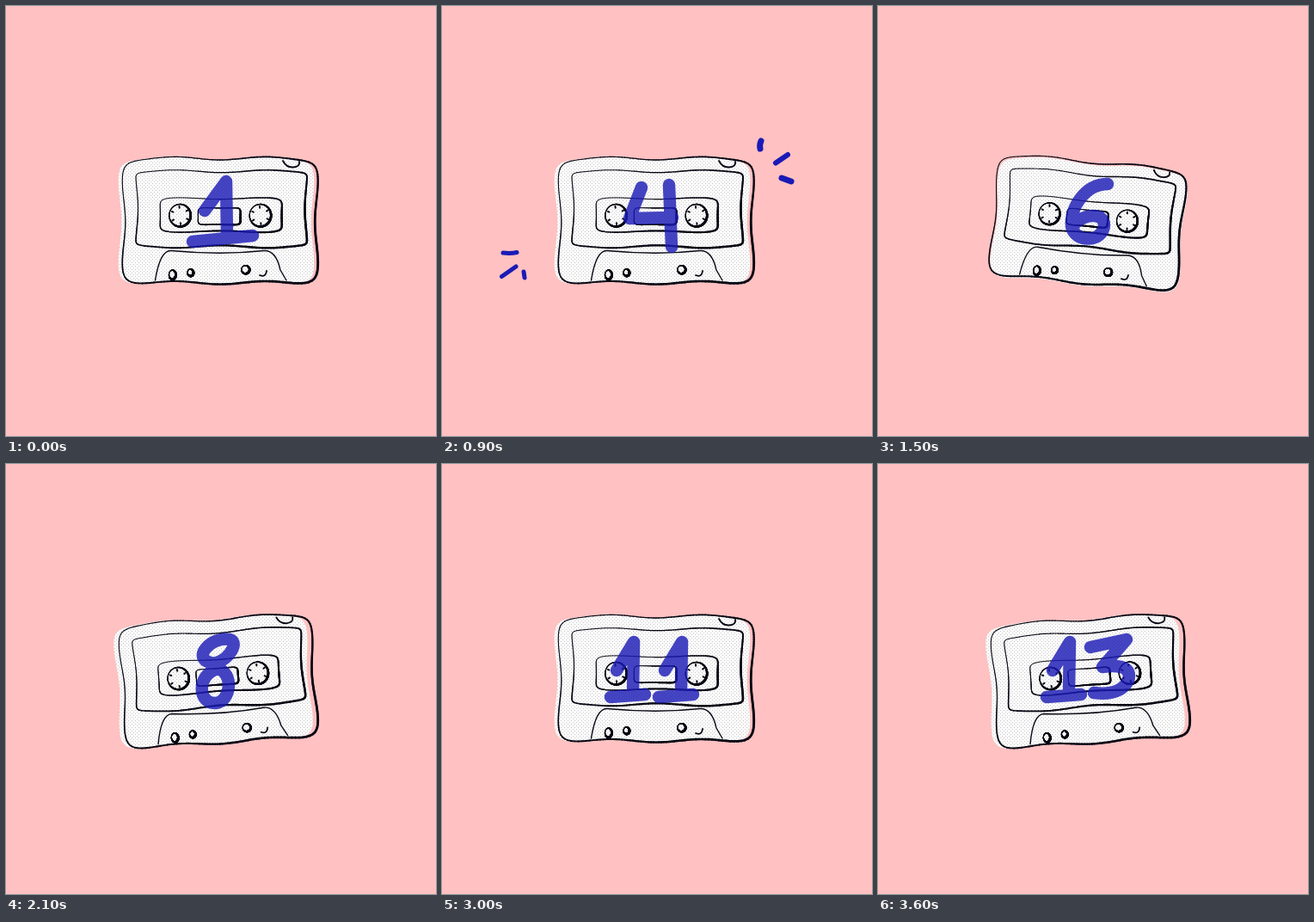
An HTML page with a canvas that plays this animation: 500x500 px, repeating every 3900 ms.

```html
<!DOCTYPE html>
<html lang="en">
<head>
<meta charset="utf-8">
<title>Counting cassette</title>
<style>
  html, body { margin: 0; width: 100%; height: 100%; overflow: hidden; background: #ffc1c1; }
  canvas { display: block; width: 500px; height: 500px; }
</style>
</head>
<body>
<canvas id="stage" width="500" height="500"></canvas>
<script>
const ctx = document.getElementById('stage').getContext('2d');
const STEP = 300, BEATS = 13, TAU = 2 * Math.PI;
const PINK = '#ffc1c1', INK = '#080814', BLUE = '#1a1ab6';

// Place of the cassette's middle, tilt in degrees, size, offset of the paper behind the lines
const poses = {
  A: { x: 249, y: 243.5, tilt: 0, size: 1, slip: [-4.5, 0] },
  B: { x: 244.5, y: 245.7, tilt: 5.3, size: .972, slip: [1.5, 2] },
  C: { x: 246.5, y: 246.2, tilt: -3.9, size: .99, slip: [-6, 0] },
  D: { x: 246.5, y: 246.2, tilt: 1.9, size: .994, slip: [-4, 0] }
};
const poseOrder = 'ABCADBACDBADC';
const markOrder = { 1: 'waves', 3: 'rays', 4: 'bolts', 6: 'sparks', 8: 'waves', 9: 'rays', 11: 'bolts' };

// Digits are drawn around their own middle
const digits = [
  'M-2 -27 C-26 -29 -26 32 -7 32 C18 35 26 -8 12 -22 Q6 -29 -2 -27',
  'M-19 -2 L6 -36 L7 27 M-33 34 L37 27',
  'M-23 -15 C-15 -34 9 -39 15 -25 C19 -8 -7 13 -22 29 Q-3 17 12 27 Q20 32 30 30',
  'M-28 -27 L14 -36 L-14 -4 Q22 -9 16 12 Q6 30 -24 26',
  'M-18 -29 L-32 7 L18 6 M14 -32 L17 40',
  'M17 -33 L-17 -32 L-20 -5 Q15 -12 17 12 Q10 37 -25 30',
  'M17 -33 C-10 -33 -27 -4 -25 16 C-22 36 12 35 13 15 C13 -1 -12 2 -22 14',
  'M-27 -30 L21 -34 Q2 -2 -6 37 M-20 3 L13 1',
  'M10 -36 C-12 -40 -34 -14 -12 -9 C4 -5 24 -33 10 -36 M-4 -2 C-30 6 -26 40 -6 38 C12 36 15 2 -4 -2',
  'M14 -29 C-6 -41 -27 -21 -19 -8 C-7 6 16 -10 15 -29 Q12 7 3 37'
];
const teen = 'M-16 0 L4 -33 L3 26 M-23 31 L17 28';

// Stroke width and path
const marks = {
  rays: [[7, 'M371 157 Q369 161 370 166 M395 200 L406 204'], [6, 'M388 182.5 L402 173'],
    [5, 'M71 287 Q80 288 87 286.5 M69.5 314.5 L86 303 M95 309 L96 316']],
  bolts: [[6, 'M68 155 L64 183 L81 175 L77 211 M110 309 L105.5 333 L117 328 L117 348 M456.5 233 L437 260 L460 255 L445 288']],
  sparks: [[6, 'M378 174 L400 158 M389 158 L392 177 M78 327 L98 317 M85 312 L92 332']],
  waves: [[6, 'M368 64 Q371 32 383 48 T402 48 T421 36 M6 392 Q13 366 25 386 T45 386 T62 407']]
};

// A loop from ellipse (corner 2) to box (high corner), with gently waving sides
function outline(cx, cy, rx, ry, corner = 2, wave = 0, pinch = true) {
  const count = 240;
  return Array.from({ length: count + 1 }, (_, i) => {
    const a = i / count * TAU, c = Math.cos(a), s = Math.sin(a);
    const k = (Math.abs(c) ** corner + Math.abs(s) ** corner) ** (-1 / corner);
    const x = rx * c * k, y = ry * s * k;
    return {
      x: cx + x - wave * c * k * Math.cos(TAU * y / 100),
      y: cy + y + wave * (pinch ? -s * k : 1) * Math.cos(TAU * x / 105),
      light: .8 * c + .6 * s
    };
  });
}

// Pen line, heavy at the lower right and fine at the upper left
function pen(points, weight) {
  for (let i = 1; i < points.length; i++) {
    ctx.lineWidth = weight * (1.1 + .5 * points[i].light);
    ctx.beginPath();
    ctx.moveTo(points[i - 1].x, points[i - 1].y);
    ctx.lineTo(points[i].x, points[i].y);
    ctx.stroke();
  }
}

function strokePath(d, width) {
  ctx.lineWidth = width;
  ctx.stroke(new Path2D(d));
}

const shell = outline(249, 249.5, 112, 72.3, 12, 1.8, false);
const paper = new Path2D();
shell.forEach(p => paper.lineTo(p.x, p.y));

function makeDots() {
  const tile = document.createElement('canvas');
  tile.width = tile.height = 4;
  const t = tile.getContext('2d');
  t.fillStyle = '#c9c9c9';
  for (const p of [.5, 2.5]) {
    t.beginPath();
    t.arc(p, p, .7, 0, TAU);
    t.fill();
  }
  return ctx.createPattern(tile, 'repeat');
}
const dots = makeDots();

function usePose({ x, y, tilt, size }) {
  ctx.translate(x, y);
  ctx.rotate(tilt * Math.PI / 180);
  ctx.scale(size, size);
  ctx.translate(-249, -243.5);
}

function drawPaper(pose) {
  ctx.save();
  ctx.translate(...pose.slip);
  usePose(pose);
  ctx.clip(paper);
  ctx.resetTransform();
  for (const fill of ['#fff', dots]) {
    ctx.fillStyle = fill;
    ctx.fillRect(0, 0, 500, 500);
  }
  ctx.restore();
}

function drawReel(x, y) {
  pen(outline(x, y, 12.5, 13), 1.7);
  for (let i = 0; i < 6; i++) {
    const a = i * TAU / 6 + .45, c = Math.cos(a), s = Math.sin(a);
    strokePath(`M${x + 8.8 * c} ${y + 8.8 * s} L${x + 10.5 * c} ${y + 10.5 * s}`, 2);
  }
}

function drawLines(pose) {
  ctx.save();
  usePose(pose);
  ctx.strokeStyle = INK;
  pen(shell, 1.75);
  pen(outline(250.5, 236, 98.5, 43.8, 24, 1.5), 1.6);
  pen(outline(250, 243, 71.5, 19.3, 9, .9), 1.4);
  pen(outline(248, 244.5, 25.3, 10.3, 7, .7), 1.4);
  strokePath('M173.5 319 Q179 284 192 284.5 Q250 290 300 284.5 Q314 284 319 307 L326 319', 1.4);
  strokePath('M322 180 Q326 188 334 187.5 Q342 187 341 181', 1.9);
  strokePath('M295 313 Q302 316 303 308', 1.8);
  for (const side of [-1, 1]) drawReel(249 + 46.7 * side, 243.5);
  pen(outline(193.5, 312.5, 4, 5.3), 1.8);
  pen(outline(214.5, 310, 3.5, 4), 1.8);
  pen(outline(278.5, 306.5, 4.7, 4.7), 1.7);
  ctx.restore();
}

function drawNumber(n) {
  const number = new Path2D();
  const add = (d, x) => number.addPath(new Path2D(d), new DOMMatrix([1, 0, 0, 1, x, 240]));
  if (n < 10) {
    add(digits[n], 250);
  } else {
    add(teen, 219);
    add(n === 11 ? teen : digits[n % 10], 275);
  }
  ctx.globalAlpha = .81;
  ctx.lineWidth = 14.5;
  ctx.stroke(number);
  ctx.globalAlpha = 1;
}

function draw(beat) {
  const pose = poses[poseOrder[beat]];
  ctx.fillStyle = PINK;
  ctx.fillRect(0, 0, 500, 500);
  ctx.lineCap = ctx.lineJoin = 'round';
  drawPaper(pose);
  drawLines(pose);
  ctx.strokeStyle = BLUE;
  drawNumber(beat + 1);
  for (const [width, d] of marks[markOrder[beat]] || []) strokePath(d, width);
}

let shown = -1;
function tick() {
  const beat = Math.floor(performance.now() / STEP) % BEATS;
  if (beat !== shown) draw(shown = beat);
  requestAnimationFrame(tick);
}
tick();
</script>
</body>
</html>
```
